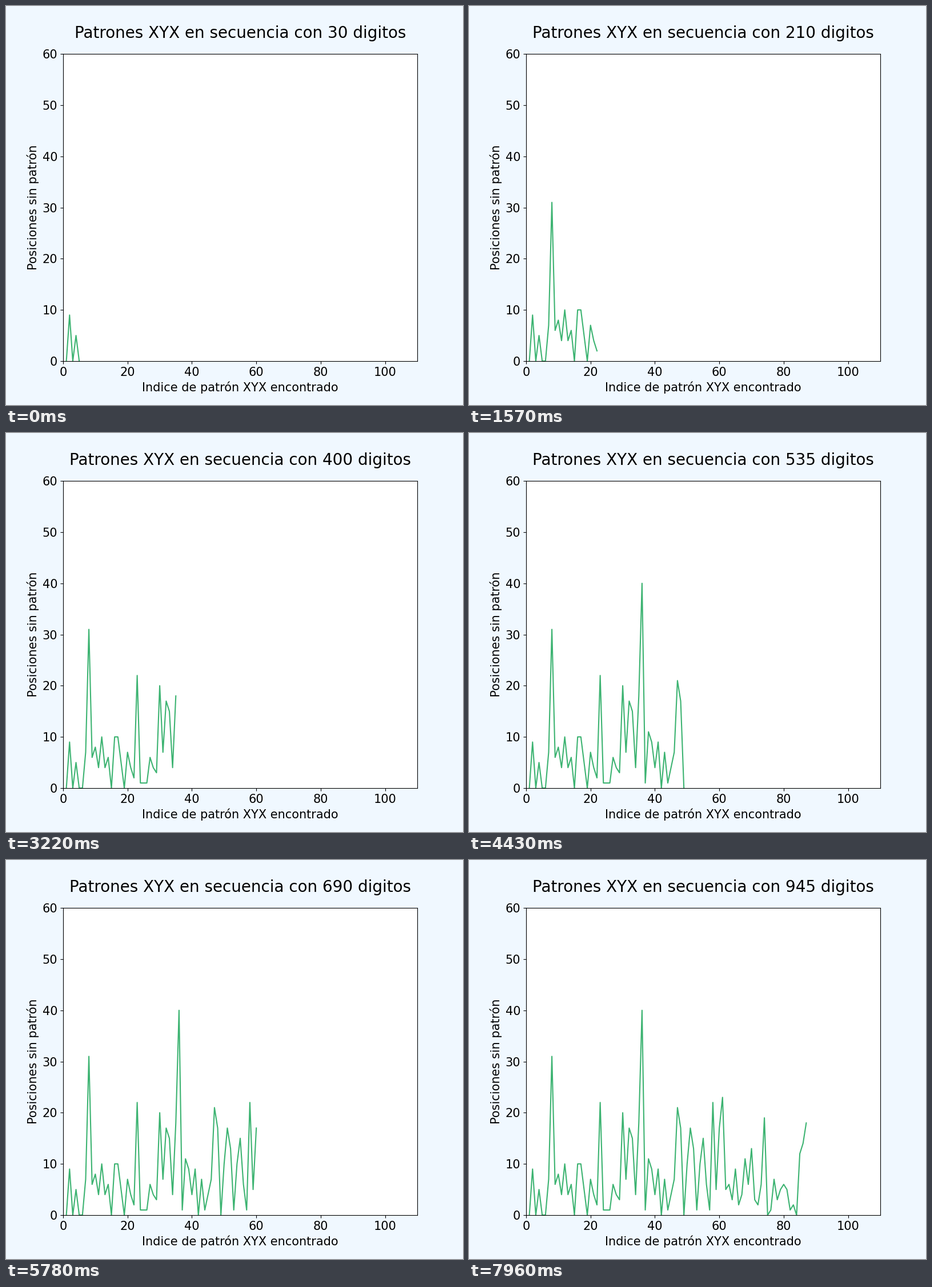
Write a matplotlib script that moves like this. It is 800 by 700 pixels and loops after 8 s.

```python
import math

import matplotlib.pyplot as plt
from matplotlib.animation import FuncAnimation

FRAMES = 184
LOOP_MS = 8000
START, STEP = 30, 5
LAG, NEAR = 6, 8


def golden_digits(count):
    """Digits of the golden ratio, leading 1 included."""
    scale = 10 ** (count + 10)
    return str((scale + math.isqrt(5 * scale * scale)) // 2)[:count]


def find_patterns(digits):
    """Gaps before each non-overlapping XYX and the position where it ends."""
    gaps, ends = [], []
    i = gap = 0
    while i < len(digits) - 2:
        if digits[i] == digits[i + 2]:
            gaps.append(gap)
            ends.append(i + 3)
            gap = 0
            i += 3
        else:
            gap += 1
            i += 1
    return gaps, ends


def reveal_times(gaps, ends):
    """Digit count at which each point appears; close followers delay it."""
    times, latest = [], 0
    for end, following in zip(ends, gaps[1:]):
        latest = max(latest, end + (LAG if following < NEAR else 0))
        times.append(latest)
    return times


gaps, ends = find_patterns(golden_digits(1100))
times = reveal_times(gaps, ends)
first = sum(end <= START for end in ends)

plt.rcParams["font.family"] = "DejaVu Sans"
fig, ax = plt.subplots(figsize=(8, 7), dpi=100, facecolor="aliceblue")
ax.set_xlim(0, 110)
ax.set_ylim(0, 60)
ax.tick_params(labelsize=15)
ax.set_xlabel("Indice de patrón XYX encontrado", fontsize=15)
ax.set_ylabel("Posiciones sin patrón", fontsize=15)
title = ax.set_title("", fontsize=20, pad=20)
line, = ax.plot([], [], color="mediumseagreen", lw=1.5)


def update(frame):
    n = START + STEP * frame
    shown = max(first, sum(t <= n for t in times))
    line.set_data(range(1, shown + 1), gaps[:shown])
    title.set_text(f"Patrones XYX en secuencia con {n} digitos")
    return line, title


anim = FuncAnimation(fig, update, frames=FRAMES, init_func=lambda: update(0),
                     interval=LOOP_MS / FRAMES, repeat=True, repeat_delay=0)
plt.show()
```
